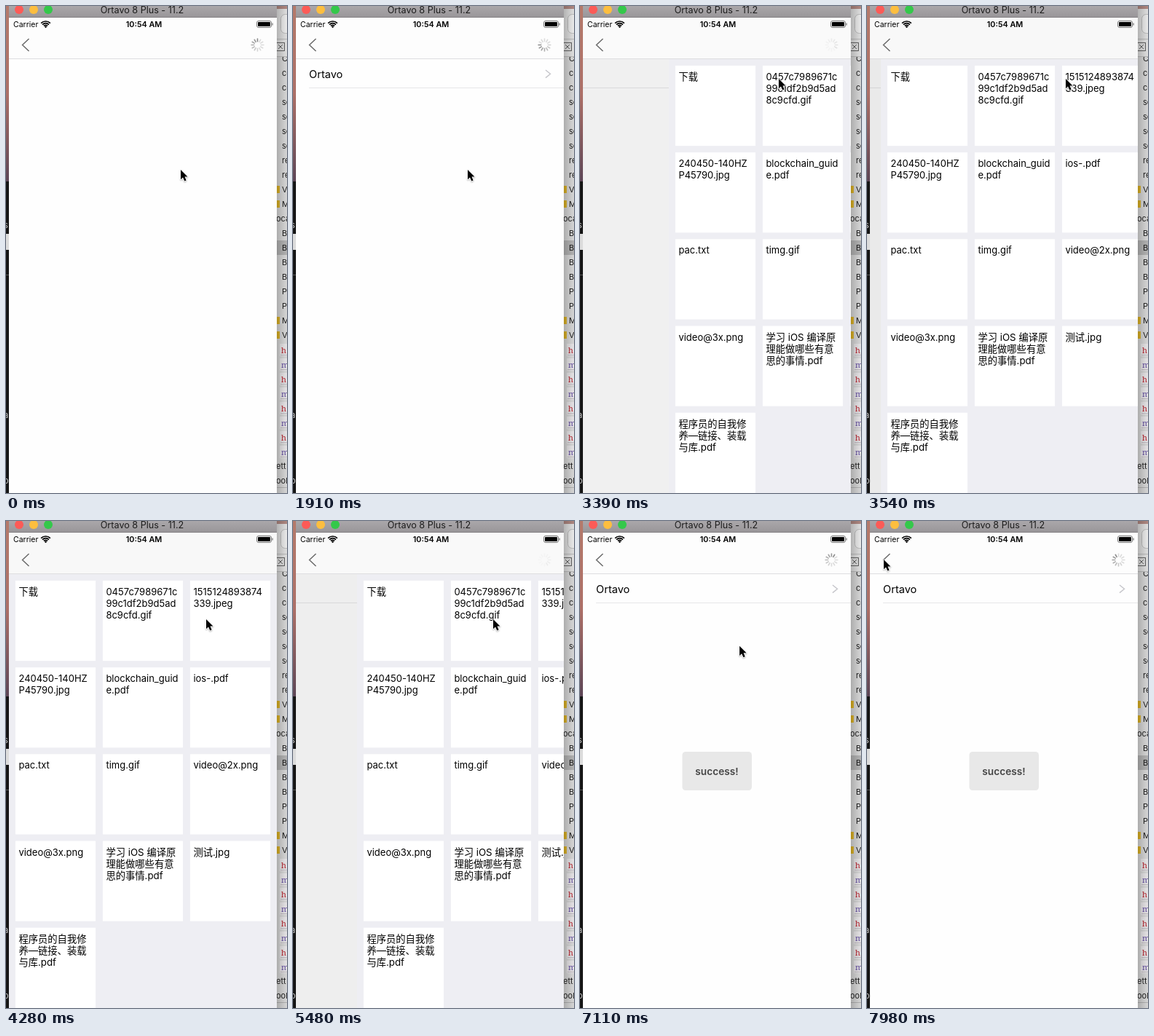
These frames come from a looping animation (386x669 px, 8 s). An HTML page with a canvas:

```html
<!DOCTYPE html>
<html>
<head>
<meta charset="utf-8">
<style>
  html, body { margin: 0; width: 100%; height: 100%; overflow: hidden; }
  canvas { display: block; }
</style>
</head>
<body>
<canvas id="stage" width="386" height="669"></canvas>
<script>
const ctx = document.getElementById('stage').getContext('2d');
const LOOP = 8000, LEFT = 4, WIDTH = 368;
const SANS = 'Inter, "Noto Sans CJK SC", "Noto Sans CJK", sans-serif';

const files = [
  ['下载'], ['0457c7989671c', '99c1df2b9d5ad', '8c9cfd.gif'], ['1515124893874', '339.jpeg'],
  ['240450-140HZ', 'P45790.jpg'], ['blockchain_guid', 'e.pdf'], ['ios-.pdf'],
  ['pac.txt'], ['timg.gif'], ['video@2x.png'],
  ['video@3x.png'], ['学习 iOS 编译原', '理能做哪些有意', '思的事情.pdf'], ['测试.jpg'],
  ['程序员的自我修', '养—链接、装载', '与库.pdf']
];
const sidebar = ['C', 'co', 'co', 'so', 'so', 'so', 'so', 're', 're', 'V', 'M', 'oca', 'B', 'B', 'B', 'B',
  'P', 'P', 'M', 'V', 'h', 'm', 'h', 'm', 'h', 'm', 'h', 'm', 'ett', 'ool'];

// time, x, y of the pointer tip
const pointerPath = [
  [0, 240, 225], [2080, 240, 225], [2350, 242, 179], [2900, 272, 102], [3000, 273, 100],
  [3690, 273, 100], [4200, 275, 135], [6600, 275, 135], [7080, 225, 172], [7400, 115, 167],
  [7690, 60, 87], [7970, 23, 53]
];

function rect(x, y, w, h, fill) {
  ctx.fillStyle = fill;
  ctx.fillRect(x, y, w, h);
}

function roundRect(x, y, w, h, r, fill) {
  ctx.beginPath();
  ctx.roundRect(x, y, w, h, r);
  if (fill) { ctx.fillStyle = fill; ctx.fill(); }
}

function text(str, x, y, size, color = '#000', weight = 400, align = 'left', family = SANS) {
  ctx.font = `${weight} ${size}px ${family}`;
  ctx.fillStyle = color;
  ctx.textAlign = align;
  ctx.fillText(str, x, y);
}

function line(points, color, width = 1) {
  ctx.beginPath();
  points.forEach(([x, y]) => ctx.lineTo(x, y));
  ctx.strokeStyle = color;
  ctx.lineWidth = width;
  ctx.stroke();
}

function gradient(x0, y0, x1, y1, ...colors) {
  const g = ctx.createLinearGradient(x0, y0, x1, y1);
  colors.forEach((c, i) => g.addColorStop(i / (colors.length - 1), c));
  return g;
}

function circle(x, y, r, fill) {
  ctx.beginPath();
  ctx.arc(x, y, r, 0, 7);
  ctx.fillStyle = fill;
  ctx.fill();
}

function drawDesktop() {
  rect(0, 0, 4, 241, gradient(0, 0, 0, 241, '#b57a6b', '#ad7068', '#5d4656'));
  rect(0, 241, 4, 428, '#151515');
  rect(0, 313, 4, 22, '#dcdcdc');
  rect(0, 369, 4, 1, '#555');
  [['s', 305], ['i', 430], ['a', 566], ['o', 656]].forEach(([s, y]) => text(s, -3, y, 11, '#ccc'));

  rect(372, 0, 14, 669, '#e3e3e3');
  rect(372, 0, 14, 4, '#b98f88');
  rect(372, 4, 14, 66, '#ececec');
  roundRect(377.5, 11.5, 20, 26, 6, '#f8f8f8');
  ctx.strokeStyle = '#c4c4c4';
  ctx.lineWidth = 1;
  ctx.stroke();
  rect(372, 45, 14, 1, '#c4c4c4');
  ctx.strokeStyle = '#666';
  ctx.strokeRect(371.5, 50.5, 11, 11);
  line([[374, 53], [380, 59]], '#666');
  line([[380, 53], [374, 59]], '#666');
  rect(372, 69, 14, 1, '#c4c4c4');
  rect(372, 322, 14, 20, '#bdbdbd');

  ctx.save();
  ctx.beginPath();
  ctx.rect(372, 70, 14, 599);
  ctx.clip();
  sidebar.forEach((label, i) => {
    const y = 72 + i * 20;
    if ('hm'.includes(label)) {
      rect(376, y - 8, 12, 17, '#f4f2f4');
      text(label, 378, y + 5, 11, label === 'h' ? '#c0202c' : '#6750a8', 400, 'left', '"Noto Serif", serif');
      line([[377, y + 7.5], [386, y + 7.5]], '#c9c4cb');
      return;
    }
    if (i > 8 && 'VM'.includes(label)) rect(371, y - 5, 5, 10, '#e9bd29');
    text(label, label.length > 2 ? 371 : 379, y + 4, 11, '#222');
  });
  ctx.restore();
  rect(372, 661, 14, 1, '#bbb');
  rect(372, 0, 14, 669, gradient(372, 0, 386, 0, 'rgba(0,0,0,.24)', 'rgba(0,0,0,.06)'));
}

function drawTitleBar() {
  rect(LEFT, 0, WIDTH, 16, gradient(0, 0, 0, 16, '#aaa7aa', '#989598'));
  rect(LEFT, 15, WIDTH, 1, '#858285');
  ['#fc5b57', '#fdbe3f', '#34c84a'].forEach((c, i) => circle(18 + i * 20, 5, 6, c));
  text('Ortavo 8 Plus - 11.2', 187, 10, 12.6, '#1c1c1c', 400, 'center');
}

function drawStatusBar() {
  text('Carrier', 10, 29, 10.5);
  text('10:54 AM', 189.5, 29, 10.8, '#000', 600, 'center');
  ctx.strokeStyle = '#000';
  ctx.lineWidth = 1.7;
  [3.6, 6.3, 9].forEach(r => {
    ctx.beginPath();
    ctx.arc(54.5, 30, r, -Math.PI * 0.75, -Math.PI * 0.25);
    ctx.stroke();
  });
  circle(54.5, 28.6, 1.3, '#000');
  roundRect(344.5, 20.5, 20, 9, 2.5);
  ctx.lineWidth = 1;
  ctx.strokeStyle = '#777';
  ctx.stroke();
  roundRect(346, 22, 17, 6, 1, '#000');
  rect(365.5, 23.5, 1.2, 3, '#777');
}

function drawSpinner(t, alpha) {
  const head = Math.floor(t / 83.33);
  ctx.save();
  ctx.translate(345.5, 53.5);
  ctx.lineCap = 'round';
  for (let i = 0; i < 12; i++) {
    const age = (head - i + 1200) % 12;
    ctx.globalAlpha = alpha * Math.max(0.25, 0.85 - age * 0.09);
    const a = i * Math.PI / 6;
    const at = r => [r * Math.sin(a), -r * Math.cos(a)];
    line([at(4.8), at(8.4)], '#777', 1.6);
  }
  ctx.restore();
}

function drawNavBar(t, pushed) {
  const shade = Math.round(253 - 5 * pushed);
  rect(LEFT, 16, WIDTH, 56, `rgb(${shade},${shade},${shade})`);
  rect(LEFT, 72, WIDTH, 1, '#dedee0');
  drawStatusBar();
  line([[31.5, 45], [22.5, 53.5], [31.5, 62]], '#666', 1.4);
  const alpha = Math.max(0, 1 - pushed * 1.15);
  if (alpha) drawSpinner(t, alpha);
}

function drawList(x, hasRow) {
  rect(x, 72, WIDTH, 597, '#fefefe');
  if (!hasRow) return;
  text('Ortavo', x + 18, 98.5, 14.6);
  line([[x + 343, 88], [x + 349.5, 93.3], [x + 343, 98.6]], '#c5c5ca', 1.4);
  rect(x + 18, 112, WIDTH - 18, 1, '#e6e6e8');
}

function drawGrid(x) {
  rect(x, 72, WIDTH, 597, '#eeeef3');
  files.forEach((lines, i) => {
    const cx = x + 8.9 + (i % 3) * 120;
    const cy = 81.9 + Math.floor(i / 3) * 119.2;
    rect(cx, cy, 110.2, 110.2, '#fff');
    lines.forEach((s, n) => {
      const cjk = /[\u3000-\u9fff]/.test(s);
      text(s, cx + 4.5, cy + 20 + n * 16, cjk ? 13.3 : 13);
    });
  });
}

function drawHud(t) {
  if (t < 5850) return;
  const dark = '#464646';
  if (t > 6300) {
    roundRect(140.5, 317, 95.5, 53, 4.5, '#e8e8e8');
    text('success!', 188, 348.5, 13.7, dark, 600, 'center');
    return;
  }
  const done = Math.min(1, (t - 5780) / 420);
  roundRect(114, 311, 148, 65, 4.5, '#e6e6e6');
  roundRect(135.8, 329.8, 104.4, 6.4, 3.2);
  ctx.strokeStyle = dark;
  ctx.lineWidth = 1.5;
  ctx.stroke();
  roundRect(137.8, 331.7, 100.4 * done, 2.6, 1.3, dark);
  text(`${Math.round(done * 100)}% completed`, 188, 355, 13.7, dark, 600, 'center');
}

function drawPointer(t) {
  let n = pointerPath.findIndex(p => p[0] > t);
  if (n < 0) n = pointerPath.length - 1;
  const [a, b] = [pointerPath[n - 1], pointerPath[n]];
  const k = Math.min(1, (t - a[0]) / (b[0] - a[0]));
  ctx.save();
  ctx.translate(a[1] + (b[1] - a[1]) * k, a[2] + (b[2] - a[2]) * k);
  ctx.shadowColor = 'rgba(0,0,0,.3)';
  ctx.shadowBlur = 2;
  ctx.shadowOffsetY = 1;
  ctx.lineJoin = 'round';
  line([[0, 0], [0, 13.3], [3, 10.5], [5.3, 15.6], [7.6, 14.6], [5.5, 9.6], [9.5, 9.5], [0, 0]], '#fff', 1.6);
  ctx.shadowColor = 'transparent';
  ctx.fillStyle = '#000';
  ctx.fill();
  ctx.restore();
}

// Critically damped spring from 0 to 1
function spring(ms) {
  const x = Math.max(0, ms) * 0.018;
  return 1 - (1 + x) * Math.exp(-x);
}

// The screen refreshes about seven times a second and rests on the grid
function hold(t) {
  return t < 5480
    ? Math.min(4280, Math.floor(t / 147.4) * 147.4)
    : 5480 + Math.floor((t - 5480) / 147) * 147;
}

function draw(t) {
  const pushed = spring(t - 3260) - spring(t - 5430);
  drawDesktop();
  ctx.save();
  ctx.beginPath();
  ctx.rect(LEFT, 0, WIDTH, 669);
  ctx.clip();
  drawList(LEFT - 0.3 * WIDTH * pushed, t > 1600);
  if (pushed > 0.001) {
    rect(LEFT, 72, WIDTH, 597, `rgba(0,0,0,${0.08 * pushed})`);
    drawGrid(LEFT + Math.round(WIDTH * (1 - pushed)));
  }
  drawNavBar(t, pushed);
  drawTitleBar();
  drawHud(t);
  ctx.restore();
  drawPointer(t);
}

function tick() {
  draw(hold(performance.now() % LOOP));
  requestAnimationFrame(tick);
}
tick();
</script>
</body>
</html>
```
